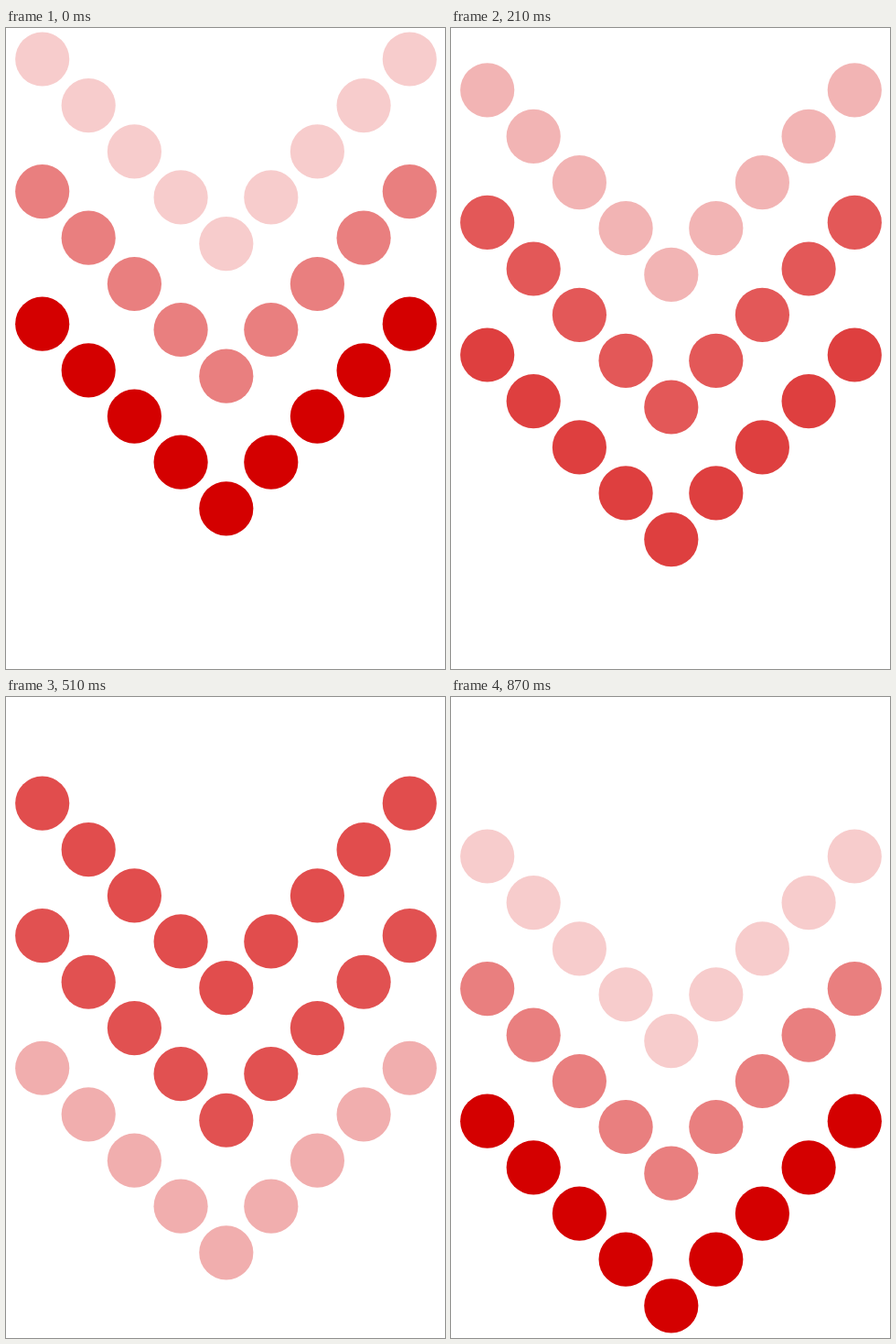
Write an HTML page with a canvas that moves like this. It is 480 px wide and 700 px high and loops after 900 ms.

```html
<!DOCTYPE html>
<html lang="en">
<head>
<meta charset="utf-8">
<title>Chevron of dots</title>
<style>
  html, body { margin: 0; width: 100%; height: 100%; overflow: hidden; background: #fff; }
  canvas { display: block; }
</style>
</head>
<body>
<canvas id="stage" width="480" height="700"></canvas>
<script>
const ctx = document.getElementById('stage').getContext('2d');

const STEP_MS = 30, STEPS = 30;
const RADIUS = 29.6, ROW_GAP = 144.6, TRAVEL = 140;
const HOLD = 0.6; // share of each third spent on a steady opacity
const XS = [39.7, 90.2, 140.4, 191.1, 240.8, 289.8, 340.4, 391.1, 441.3];
const YS = [34, 84.6, 134.9, 184.9, 235.6];
const OPACITIES = [0.2, 0.5, 1];

function opacity(row, progress) {
  const third = Math.floor(progress * 3);
  const fade = Math.max(0, (progress * 3 - third - HOLD) / (1 - HOLD));
  const from = OPACITIES[(row + third) % 3];
  const to = OPACITIES[(row + third + 1) % 3];
  return from + (to - from) * fade;
}

function drawChevron(top, alpha) {
  ctx.fillStyle = `rgba(212, 0, 0, ${alpha})`;
  XS.forEach((x, i) => {
    ctx.beginPath();
    ctx.arc(x, top + YS[4 - Math.abs(i - 4)], RADIUS, 0, Math.PI * 2);
    ctx.fill();
  });
}

function draw(now) {
  const progress = Math.floor(now / STEP_MS) % STEPS / (STEPS - 1);
  ctx.clearRect(0, 0, 480, 700);
  for (let row = 0; row < 3; row++) {
    drawChevron(row * ROW_GAP + progress * TRAVEL, opacity(row, progress));
  }
}

const start = performance.now();
function loop() {
  draw(performance.now() - start);
  requestAnimationFrame(loop);
}
loop();
</script>
</body>
</html>
```
